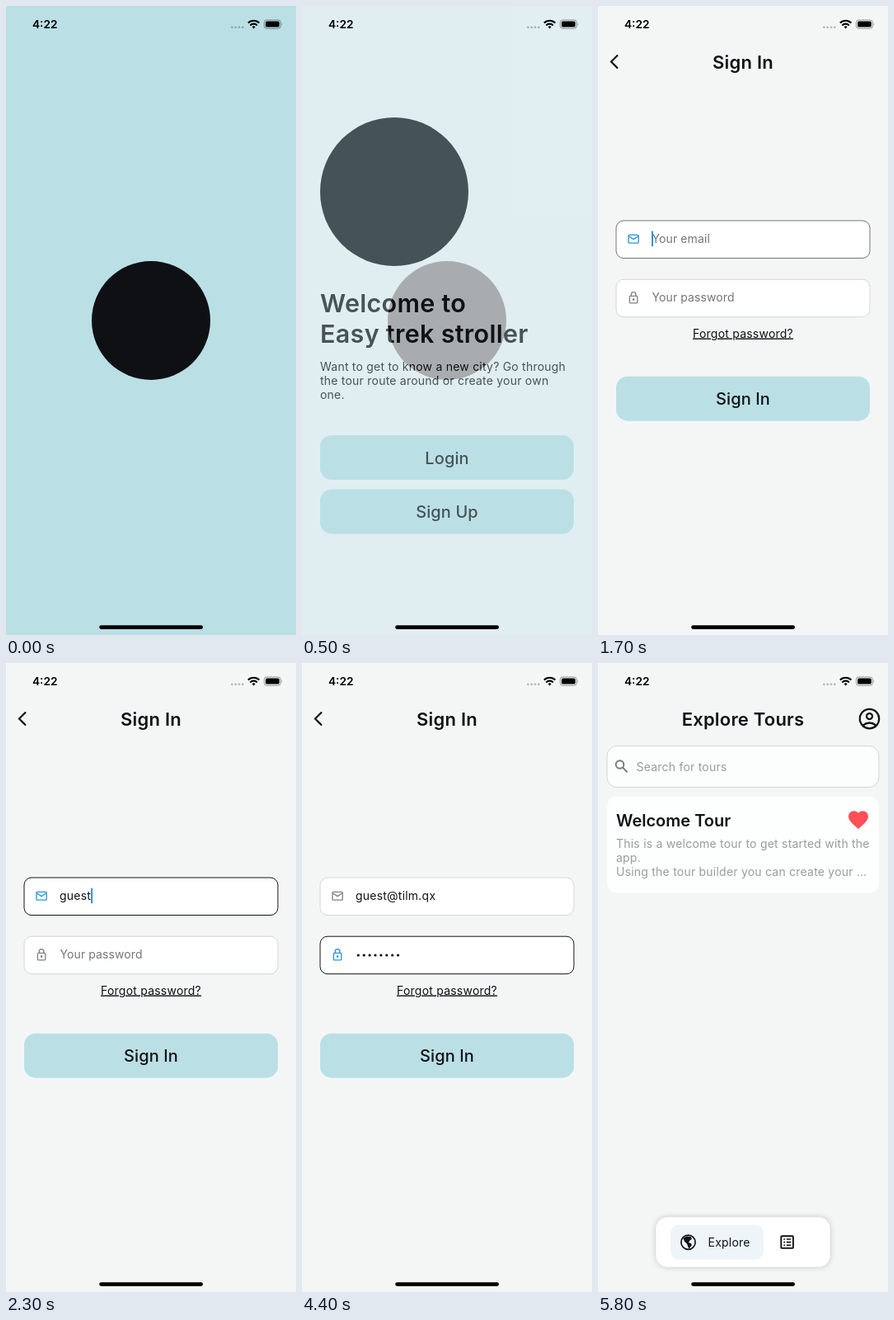
Animation, 352 px wide and 762 px high, one loop 5900 ms. Source, as an HTML page:

```html
<!DOCTYPE html>
<html lang="en">
<head>
<meta charset="utf-8">
<title>Tour app sign in</title>
<style>
  html, body { margin: 0; width: 100%; height: 100%; overflow: hidden; background: #f4f6f6; }
  svg { display: block; width: 352px; height: 762px; }
  text { font-family: Inter, "Open Sans", sans-serif; fill: #111214; }
  .mid { text-anchor: middle; }
  .title { font-size: 22px; font-weight: 600; letter-spacing: .2px; }
  .hero { font-size: 30.5px; font-weight: 600; letter-spacing: .3px; }
  .body { font-size: 14px; letter-spacing: .22px; }
  .label { font-size: 20px; font-weight: 500; letter-spacing: .1px; }
  .card { font-size: 20px; font-weight: 600; }
  .time { font-size: 13.7px; font-weight: 600; fill: #000; }
  .hint { fill: #757575; letter-spacing: .1px; }
  .pale { fill: #9a9b9c; }
  .line { fill: none; stroke: #111214; }
  .page { fill: #f4f6f6; }
  .btn { fill: #bae0e6; }
  .icon { fill: none; stroke-width: 1.35; }
</style>
</head>
<body>
<svg viewBox="0 0 352 762">
  <defs>
    <filter id="soft" x="-10%" y="-30%" width="120%" height="160%">
      <feDropShadow dx="0" dy="0" stdDeviation="3.5" flood-color="#000" flood-opacity=".22"/>
    </filter>
  </defs>

  <g id="splash">
    <rect width="352" height="762" fill="#bae0e6"/>
    <circle cx="176" cy="381" r="72" fill="#0f1014"/>
  </g>

  <g id="welcome">
    <rect width="352" height="762" fill="#f3f6f9"/>
    <circle cx="112" cy="225" r="90" fill="#0f1014"/>
    <text class="hero" x="22" y="371">Welcome to</text>
    <text class="hero" x="22" y="408">Easy trek stroller</text>
    <text class="body" x="22" y="442">Want to get to know a new city? Go through</text>
    <text class="body" x="22" y="459">the tour route around or create your own</text>
    <text class="body" x="22" y="476">one.</text>
    <rect class="btn" x="22" y="520" width="308" height="54" rx="14"/>
    <text class="label mid" x="176" y="554.5">Login</text>
    <rect class="btn" x="22" y="585.5" width="308" height="54" rx="14"/>
    <text class="label mid" x="176" y="619.5">Sign Up</text>
  </g>

  <g id="signin">
    <rect class="page" width="352" height="762"/>
    <path class="line" d="M24 59.5 16 67.5l8 8" stroke-width="2.2"/>
    <text class="title mid" x="176" y="75.5">Sign In</text>
    <g id="form">
      <rect id="mailBox" x="22" y="260" width="308" height="45.5" rx="9" fill="#fff"/>
      <g id="mailIcon" class="icon">
        <rect x="37" y="277.4" width="12.2" height="9.8" rx="1"/>
        <path d="M37.3 278.8l5.8 3.8 5.8-3.8"/>
      </g>
      <text id="mailHint" class="body hint" x="65.5" y="287">Your email</text>
      <text id="mail" class="body" x="65" y="287"></text>

      <rect id="passBox" x="22" y="331.2" width="308" height="45.5" rx="9" fill="#fff"/>
      <g id="passIcon" class="icon">
        <rect x="38.4" y="351.3" width="9.4" height="8.6" rx="1"/>
        <path d="M40.3 351v-1.6a2.8 2.8 0 0 1 5.6 0v1.6"/>
        <circle cx="43.1" cy="355.6" r=".7"/>
      </g>
      <text id="passHint" class="body hint" x="65.5" y="358">Your password</text>
      <g id="dots"></g>
      <rect id="caret" width="2" height="18.5" fill="#2b95db"/>

      <text class="body mid" x="176" y="401.5" text-decoration="underline">Forgot password?</text>
      <rect class="btn" x="22" y="448.7" width="308" height="54" rx="14"/>
      <text class="label mid" x="176" y="483">Sign In</text>
    </g>
    <path id="spin" fill="none" stroke="#bae0e6" stroke-width="4"/>
  </g>

  <g id="home">
    <rect class="page" width="352" height="762"/>
    <text class="title mid" x="176" y="75.5">Explore Tours</text>
    <g class="line" stroke-width="2.2">
      <circle cx="329.5" cy="67.6" r="11.7"/>
      <circle cx="329.5" cy="64.6" r="3.5"/>
      <path d="M321.4 75.6q8.1-6.2 16.2 0"/>
    </g>

    <rect x="11" y="100.5" width="330" height="50" rx="12" fill="#fcfefd" stroke="#d2d5d5"/>
    <g fill="none" stroke="#77797a" stroke-width="1.9">
      <circle cx="26.5" cy="123" r="4.8"/>
      <path d="M30 126.5l5.6 5.8"/>
    </g>
    <text class="body pale" x="46.5" y="130.5">Search for tours</text>

    <rect x="11" y="161.5" width="330" height="117" rx="12" fill="#fdfefe"/>
    <text class="card" x="22" y="197.5">Welcome Tour</text>
    <path fill="#ff4f57" transform="translate(301.6 175.6) scale(1.2)"
      d="M12 21.3 10.6 20C5.4 15.4 2 12.3 2 8.5A5.4 5.4 0 0 1 7.5 3C9.2 3 10.9 3.8 12 5.1 13.1 3.8 14.8 3 16.5 3A5.4 5.4 0 0 1 22 8.5c0 3.8-3.4 6.9-8.6 11.5z"/>
    <text class="body pale" x="22" y="223.5">This is a welcome tour to get started with the</text>
    <text class="body pale" x="22" y="241">app.</text>
    <text class="body pale" x="22" y="258">Using the tour builder you can create your …</text>

    <rect x="70.5" y="671.5" width="211" height="60" rx="14" fill="#fff" filter="url(#soft)"/>
    <rect x="88" y="680.5" width="113" height="42.5" rx="10" fill="#eef5f9"/>
    <circle class="line" cx="109.5" cy="701.8" r="8.6" stroke-width="1.7"/>
    <path fill="#111214" d="M103.5 697l4-2.5 5 .5 1.5 2.8-2.5 1.7-1.5 2.5 3.2 1.3.6 2.2-3.3 4-1.5-3-1-3-3-2.5z"/>
    <text class="body" x="133.5" y="706.5">Explore</text>
    <rect class="line" x="222.3" y="694.3" width="14.6" height="14.6" rx="1" stroke-width="1.9"/>
    <path class="line" d="M225.3 698h1.8m1.7 0h5.4M225.3 701.6h1.8m1.7 0h5.4M225.3 705.2h1.8m1.7 0h5.4" stroke-width="1.6"/>
  </g>

  <g id="status">
    <text class="time" x="32" y="27">4:22</text>
    <g fill="#000" fill-opacity=".25">
      <circle cx="274.4" cy="25.8" r="1.4"/><circle cx="278.7" cy="25.8" r="1.4"/>
      <circle cx="283" cy="25.8" r="1.4"/><circle cx="287.3" cy="25.8" r="1.4"/>
    </g>
    <g fill="none" stroke="#000" stroke-width="2.1">
      <path d="M293.8 20.6a9.6 9.6 0 0 1 13.6 0"/>
      <path d="M296.4 23.4a5.9 5.9 0 0 1 8.4 0"/>
    </g>
    <path d="M300.6 27.5l-2-2.2a2.9 2.9 0 0 1 4 0z"/>
    <rect x="313.4" y="17" width="20" height="10.2" rx="3" fill="none" stroke="#000" stroke-opacity=".4"/>
    <rect x="315" y="18.6" width="16.8" height="7" rx="1.7"/>
    <path d="M334.6 20.5q1.6 1.6 0 3.2z" fill-opacity=".45"/>
    <rect x="113.2" y="750.2" width="125.8" height="4.8" rx="2.4"/>
  </g>
</svg>

<script>
const LOOP = 5900, STEP = 100, SPIN_START = 4160;
const EMAIL = "guest@tilm.qx";
const BLUE = "#2b95db", GREY = "#7f8283";
const $ = id => document.getElementById(id);

// [time, value] pairs; each value holds until the next one
const steps = {
  welcome: [[0, 0], [300, .1], [400, .4], [500, .68], [600, .89], [700, .97], [800, 1]],
  signin: [[0, 0], [1200, .6], [1300, 1]],
  home: [[0, 0], [5100, .6], [5200, .92], [5300, 1]],
  mailFocus: [[0, 0], [1700, .5], [1800, 1], [3300, .5], [3400, 0]],
  passFocus: [[0, 0], [3300, .5], [3400, 1]],
  chars: [[0, 0], [2000, 1], [2100, 3], [2200, 4], [2300, 5], [2600, 6],
          [2900, 8], [3000, 10], [3200, 11], [3300, 13]],
  dots: [[0, 0], [3600, 2], [3700, 3], [3800, 5], [3900, 6], [4000, 8]],
  caret: [[0, 0], [1700, 1], [4200, 0]],
  loading: [[0, 0], [4500, 1]]
};

function at(name, t) {
  let value = 0;
  for (const [time, v] of steps[name]) if (t >= time) value = v;
  return value;
}

const show = (id, alpha) => $(id).setAttribute("opacity", alpha);

// cubic-bezier(.4, 0, .2, 1)
function ease(x) {
  x = Math.min(1, Math.max(0, x));
  let lo = 0, hi = 1;
  for (let i = 0; i < 24; i++) {
    const s = (lo + hi) / 2;
    const bx = 3 * (1 - s) * (1 - s) * s * .4 + 3 * (1 - s) * s * s * .2 + s * s * s;
    if (bx < x) lo = s; else hi = s;
  }
  return lo * lo * (3 - 2 * lo);
}

function arc(u) {
  const phase = u / 1333 % 1, turn = u / 2222 % 1;
  const head = ease(phase * 2), tail = ease(phase * 2 - 1);
  const from = Math.PI * (-.5 + tail * 1.5 + turn * 2 + phase * .5);
  const sweep = Math.max((head - tail) * 1.5 * Math.PI, .01);
  const point = a => `${176 + 16 * Math.cos(a)} ${381 + 16 * Math.sin(a)}`;
  return `M${point(from)}A16 16 0 ${sweep > Math.PI ? 1 : 0} 1 ${point(from + sweep)}`;
}

function field(name, focus, active) {
  const mix = (a, b) => Math.round(a + (b - a) * focus);
  $(name + "Box").setAttribute("stroke", `rgb(${mix(211, 17)},${mix(214, 18)},${mix(215, 20)})`);
  $(name + "Icon").setAttribute("stroke", active ? BLUE : GREY);
}

for (let i = 0; i < 8; i++) {
  const dot = document.createElementNS("http://www.w3.org/2000/svg", "circle");
  dot.setAttribute("cx", 68.3 + i * 6.9);
  dot.setAttribute("cy", 354);
  dot.setAttribute("r", 1.6);
  $("dots").append(dot);
}

function draw(t) {
  for (const id of ["welcome", "signin", "home", "caret"]) show(id, at(id, t));

  const onPass = t >= 3400;
  field("mail", at("mailFocus", t), t >= 1700 && !onPass);
  field("pass", at("passFocus", t), onPass);

  const chars = at("chars", t), count = at("dots", t);
  $("mail").textContent = EMAIL.slice(0, chars);
  show("mailHint", chars ? 0 : 1);
  show("passHint", count ? 0 : 1);
  [...$("dots").children].forEach((dot, i) => dot.setAttribute("opacity", i < count ? 1 : 0));

  const end = onPass ? count * 6.9 : chars ? $("mail").getComputedTextLength() : 0;
  $("caret").setAttribute("x", 65 + end);
  $("caret").setAttribute("y", onPass ? 344 : 272.7);

  const loading = at("loading", t);
  show("form", 1 - loading);
  show("spin", loading);
  $("spin").setAttribute("d", arc(Math.max(0, t - SPIN_START)));
}

function tick() {
  const t = performance.now() % LOOP;
  draw(Math.floor(t / STEP) * STEP);
  requestAnimationFrame(tick);
}
tick();
</script>
</body>
</html>
```
